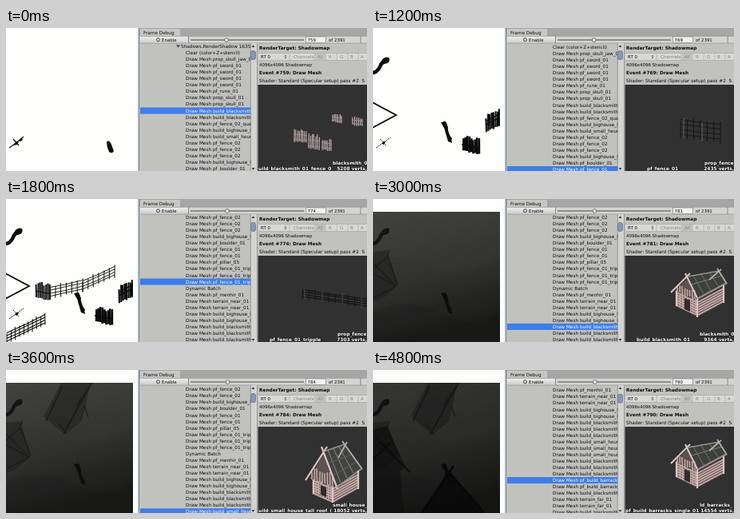
These frames come from a looping animation (452 by 179 pixels, 5400 ms). An HTML page:

```html
<!DOCTYPE html>
<html lang="en">
<head>
<meta charset="utf-8">
<title>Frame Debug</title>
<style>
html, body { margin: 0; width: 100%; height: 100%; overflow: hidden; background: #fefefc; }
svg { display: block; width: 452px; height: 179px; }
text { font: 5.78px "DejaVu Sans", sans-serif; fill: #0c0c0c; white-space: pre; }
.b { font-weight: bold; font-size: 5.8px; }
.r { font-size: 5.75px; }
.s { font-size: 5.45px; }
.dim { fill: #858585; font-size: 5.5px; }
.cap { font-weight: bold; font-size: 5.9px; fill: #fff; paint-order: stroke; stroke: #111; stroke-width: 1px; }
.end { text-anchor: end; }
.state { visibility: hidden; animation: show 5400ms step-end infinite; animation-delay: calc(var(--i) * 600ms - 5400ms); }
@keyframes show { 0% { visibility: visible; } 11.1112%, 100% { visibility: hidden; } }
</style>
</head>
<body>
<svg id="stage" viewBox="0 0 452 179" xmlns="http://www.w3.org/2000/svg"></svg>
<script>
const text = (x, y, s, cls = '', extra = '') => `<text x="${x}" y="${y}" class="${cls}" ${extra}>${s}</text>`;
const rect = (x, y, w, h, fill, extra = '') => `<rect x="${x}" y="${y}" width="${w}" height="${h}" fill="${fill}" ${extra}/>`;
const line = (d, color, w = 1, extra = '') => `<path d="${d}" fill="none" stroke="${color}" stroke-width="${w}" ${extra}/>`;
const shape = (d, fill, extra = '') => `<path d="${d}" fill="${fill}" ${extra}/>`;
const random = seed => () => (seed = (seed * 16807) % 2147483647) / 2147483647;

// Upright boards of uneven length standing on the line x0,y0 - x1,y1.
function pickets(x0, y0, x1, y1, h, n, w, color, seed = 7) {
  const rnd = random(seed * 977);
  let d = '';
  for (let k = 0; k < n; k++) {
    const t = k / (n - 1), x = x0 + (x1 - x0) * t, y = y0 + (y1 - y0) * t;
    const top = y - h * (0.82 + 0.28 * rnd());
    d += `M${x.toFixed(1)} ${(y + rnd() * 2).toFixed(1)}L${(x + rnd() - 0.5).toFixed(1)} ${top.toFixed(1)}`;
  }
  return line(d, color, w);
}

// Rail fence: several rails with thin posts.
function rails(x0, y0, x1, y1, h, n, color, w = 0.9) {
  let d = '';
  for (let k = 0; k < 4; k++) {
    const up = h * (0.15 + k * 0.25), bow = k % 2 ? 1.5 : -0.5;
    d += `M${x0} ${y0 - up}Q${(x0 + x1) / 2} ${(y0 + y1) / 2 - up + bow} ${x1} ${y1 - up}`;
  }
  return line(d, color, w) + pickets(x0, y0, x1, y1, h, n, 1, color, 3);
}

const rows = ['Shadows.RenderShadow 1635', 'Clear (color+Z+stencil)'];
[['prop_skull_jaw_01', 1], ['pf_sword_01', 4], ['pf_rune_01', 1], ['prop_skull_01', 2],
 ['build_blacksmith_01', 2], ['pf_fence_02_quad', 1], ['build_bighouse_l', 1], ['build_small_house', 1],
 ['pf_fence_02', 3], ['build_bighouse_l', 1], ['pf_boulder_01', 1], ['pf_fence_01', 2], ['pf_pillar_05', 1],
 ['pf_fence_01_tripple', 3], ['', 1], ['pf_menhir_01', 1], ['terrain_near_01', 2], ['build_bighouse_l', 2],
 ['build_blacksmith_01', 3], ['build_small_house', 3], ['build_blacksmith_01', 3], ['pf_build_barracks', 2],
 ['build_blacksmith_01', 1], ['terrain_far_01', 2], ['build_blacksmith_01', 1]
].forEach(([name, count]) => {
  for (; count--;) rows.push(name ? 'Draw Mesh ' + name : 'Dynamic Batch');
});

function list(event, scroll) {
  let out = '';
  rows.forEach((name, k) => {
    const y = 23 + 8.05 * k - scroll;
    if (y < 13 || y > 184) return;
    const picked = k === event - 749;
    if (picked) out += rect(168, y - 4, 138.5, 8, '#3e7de7');
    if (!k) out += shape(`M213 ${y - 2}h5l-2.5 4z`, '#555');
    out += text(k ? 225 : 219, y + 2, name, '', picked ? 'style="fill:#fff"' : '');
  });
  return `<g clip-path="url(#listClip)">${out}</g>` +
    rect(306.5, 28.5 + scroll * 0.008, 6, 11, '#8798b8', 'rx="2.5" stroke="#5c6b8b" stroke-width=".7"');
}

// Shadow map pieces
const ink = '#0b0b0b';
const plane = line('M4 150L9 146.5L13 143.5L22 136M9 139l7 8', ink, 1.2) +
  shape('M9 147l3-4 4-1-2 4zM16 141l4-3 1 2-3 2z', ink);
const faintPlane = line('M4 150L22 137M9 139l8 9', ink, 1, 'stroke-dasharray="2 1"') + shape('M11 145l2-3 3 0-2 4z', ink);
const stone = shape('M126 142Q130 140 132 146L135 154Q133 158 129 155Q126 149 126 142Z', ink);
const hookTop = c => line('M-1 56Q5 56 9 48Q11 41 19 40', c, 4.5) + shape('M11 40Q15 35 20 37Q22 41 18 44L11 46Z', c);
const hookLow = c => line('M88 118Q92 121 92 128Q94 137 98 140', c, 4) + shape('M85 118l6-1 3 8-4 2zM92 135l6 3 1 6-5-2z', c);
const boards = pickets(113, 153, 133, 157, 18, 9, 2.5, ink, 4) + line('M111 146L134 150', ink, 1.5) +
  pickets(142, 129, 158, 121, 19, 8, 2.1, ink, 9) + line('M141 121L159 112M141 117L159 107', ink, 1.4);
const gable = line('M-1 93L29 109L-1 125', ink, 1.8);
const railFences = pickets(38, 122, 55, 126, 18, 8, 1.9, ink, 5) + line('M37 115L56 119', ink, 1.2) +
  rails(55, 124, 96, 115, 15, 7, ink) + rails(96, 115, 136, 97, 14, 7, ink) +
  rails(1, 180, 49, 157, 14, 10, ink, 1.1);

const night = rect(0, 16, 159, 163, 'url(#night)') +
  shape('M0 75Q40 66 78 84T158 72V179H0Z', '#1b1b1b', 'opacity=".07"') +
  shape('M0 139Q45 122 91 145T158 139V179H0Z', '#111', 'opacity=".1"');
const dusk = night + hookTop('#141414') + hookLow('#0e0e0e') +
  line('M-1 79L29 109L-1 125M-1 93L29 109', '#161616', 1.5, 'opacity=".75"');
const leftRoof = shape('M0 66L18 64L31 108L12 125L0 128Z', '#1c1c1b', 'opacity=".5"') +
  line('M16 76L21 63M0 88L18 72L31 107', '#161616', 1.6, 'opacity=".6"');
const topHouse = shape('M47 58L69 16H106L95 64L74 81L56 66Z', '#1a1a1a', 'opacity=".45"') +
  line('M50 64L71 20M72 80L101 27M88 45L108 16', '#131313', 2, 'opacity=".6"') +
  line('M66 67L76 80M98 45L103 59', '#181818', 2, 'opacity=".6"');
const lowRoof = shape('M61 179L92 129H98L139 179Z', '#0a0a0a', 'opacity=".88"') +
  line('M61 179L101 120M88 120L138 177', '#070707', 3);
const foreground = rect(0, 16, 159, 163, '#080808', 'opacity=".2"') +
  shape('M0 74L17 70L41 121L34 127L39 179H0Z', '#0d0d0d', 'opacity=".6"') +
  line('M0 112L22 91M8 89L46 128', '#0a0a0a', 2.5, 'opacity=".8"');

// Preview meshes
const wood = '#c5aaa5', grey = '#92928e', pale = '#dac4bf';
const smallFence = (x, y, w, h) => pickets(x, y + h - 2, x + w, y + h, h - 2, Math.round(w / 2), 1.2, '#b9aaa8', x) +
  line(`M${x - 1} ${y + h * .35}l${w + 2} 2M${x - 1} ${y + h * .75}l${w + 2} 2`, '#a49896', .9);
const meshFences = smallFence(409, 107, 11, 11) + smallFence(434, 111, 12, 11) + smallFence(361, 127, 15, 16) +
  smallFence(379, 133, 13, 19) + smallFence(396, 138, 11, 15);
const meshBoards = pickets(393, 150, 420, 139, 39, 9, 3.1, '#555954', 8) + pickets(393, 149, 420, 138, 38, 9, 2.3, '#858b87', 8) +
  line('M386 126L428 113M387 145L429 131', '#c9c9c5', 1.4) +
  line('M387 101L390 154', wood, 4.5) + line('M423 91L425 139', wood, 5) + line('M388 101L391 154M425 91L427 139', '#8f7b76', 1);
const meshRail = rails(385, 137, 435, 143, 25, 7, '#151515') + line('M389 113V138M412 118V142', '#77736e', .8);
const meshRails = rails(371, 124, 453, 136, 12, 11, '#161514', 1.2) +
  line('M374 112V125M396 115V129M421 118V133M445 121V137', '#5d5550', .8);
const meshLand = shape('M370 138Q374 128 388 127Q405 127 417 119Q427 108 434 108Q439 111 434 123L444 135Q440 143 427 147Q413 153 396 147Q380 146 370 138Z', 'url(#land)') +
  line('M374 137Q405 139 434 114M382 142Q415 143 437 126M397 146Q423 147 441 134', '#9b9b9b', .8) + line('M380 131Q408 133 428 115', '#cfcfcf', .7);

// Stacked logs, n high, from the top log downwards.
const logs = (x0, y0, x1, y1, n) => {
  let d = '';
  for (let k = 0; k < n; k++) d += `M${x0} ${y0 + k * 3.2}L${x1} ${y1 + k * 3.2}`;
  return line(d, '#5d5050', 3.2) + line(d, wood, 1.8);
};
const meshTall = shape('M398 102L424 93L445 123L414 146Z', '#41433f') +
  line('M403 100L419 141M410 98L427 135M417 96L435 129', '#74767a', 1.3) + line('M405 116L432 106M411 131L439 115', '#5f615f', 1) +
  logs(384, 138, 409, 149, 6) + logs(409, 149, 441, 131, 6) +
  shape('M398 104L380 136L411 146Z', '#5d5250') + pickets(383, 137, 409, 145, 15, 9, 1.5, wood, 6) +
  pickets(385, 153, 407, 162, 16, 8, 1.6, wood, 5) + shape('M394 144l7 3v12l-7-3z', '#2f2b2a') +
  line('M375 138L402 96M395 96L415 149', pale, 2.2) + line('M398 102L424 93', grey, 1.8) +
  line('M421 89L446 124M427 90L416 110', '#b5aeab', 1.8) + line('M414 147L446 123', grey, 2) +
  line('M385 137V155M409 146V166M441 126V149', pale, 2.3);
const meshBarracks = shape('M394 97L434 90L442 105L406 124Z', '#3e403b') +
  line('M401 96L414 119M411 94L423 115M421 92L433 110', '#666a66', 1.1) + line('M399 107L437 96', '#7b7e79', 1) +
  logs(380, 117, 405, 129, 6) + logs(407, 129, 439, 112, 6) +
  shape('M394 99L378 115L404 125Z', '#5d5250') + pickets(381, 116, 403, 124, 9, 8, 1.5, wood, 6) +
  pickets(381, 133, 404, 143, 17, 8, 1.5, wood, 5) + shape('M390 124l7 3v14l-7-3z', '#302d2c') +
  line('M373 117L397 93M391 93L407 126', pale, 2) + line('M394 97L434 90', grey, 1.6) +
  line('M431 87L443 106M436 88L421 101', '#b5aeab', 1.7) + line('M406 125L443 105', grey, 2) +
  line('M380 115V134M406 125V148M439 108V130', pale, 2.2);

const standard = 'Shader: Standard (Specular setup) pass #2  S';
const terrain = 'Shader: Standard Terrain(Specular setup) pass';
const caption = (x, name, topX, top, verts) => text(x, 178, name, 'cap') + text(topX, 171, top, 'cap') + text(452, 178, verts + ' verts,', 'cap end');
const fenceSet = hookTop(ink) + hookLow(ink) + faintPlane + boards;
const tallCaption = caption(312, 'build_small_house_tall_roof_(', 409, 'small_house_', 18052);

const states = [
  { event: 759, scroll: 0, scene: plane + stone, mesh: meshFences, label: caption(312, 'build_blacksmith_01_fence_0', 409, 'blacksmith_0', 5208) },
  { event: 764, scroll: 0, scene: fenceSet, mesh: meshBoards, label: caption(343, 'pf_fence_02', 415, 'prop_fence_', 1313) },
  { event: 769, scroll: 7, scene: fenceSet + gable, mesh: meshRail, label: caption(343, 'pf_fence_01', 415, 'prop_fence_', 2435) },
  { event: 774, scroll: 120.7, scene: fenceSet + gable + railFences, mesh: meshRails, label: caption(330, 'pf_fence_01_tripple', 415, 'prop_fence_', 7303) },
  { event: 778, scroll: 120.7, scene: dusk, mesh: meshLand, shader: terrain, label: caption(337, 'terrain_near_01', 414, 'terrain_near', 4260) },
  { event: 781, scroll: 120.7, scene: dusk + leftRoof, mesh: meshBarracks, label: caption(330, 'build_blacksmith_01', 409, 'blacksmith_0', 9364) },
  { event: 784, scroll: 127.5, scene: dusk + leftRoof + topHouse, mesh: meshTall, label: tallCaption },
  { event: 786, scroll: 143.6, scene: dusk + leftRoof + topHouse + lowRoof, mesh: meshTall, label: tallCaption },
  { event: 790, scroll: 215, scene: dusk + leftRoof + topHouse + foreground + lowRoof, mesh: meshBarracks, label: caption(316, 'pf_build_barracks_single_01', 409, 'ld_barracks_', 14554) }
];

const defs = `<defs>
  <clipPath id="listClip"><rect x="168" y="19.5" width="138.5" height="160"/></clipPath>
  <clipPath id="meshClip"><rect x="315.5" y="71" width="137" height="108"/></clipPath>
  <clipPath id="sceneClip"><rect y="16" width="159" height="163"/></clipPath>
  <linearGradient id="night" x2=".25" y2="1"><stop stop-color="#42423f"/><stop offset=".55" stop-color="#333331"/><stop offset="1" stop-color="#1a1a19"/></linearGradient>
  <linearGradient id="land" x2="0" y2="1"><stop stop-color="#bdbdbd"/><stop offset="1" stop-color="#aaa"/></linearGradient>
  <linearGradient id="bar" x2="0" y2="1"><stop stop-color="#eee"/><stop offset="1" stop-color="#ccc"/></linearGradient>
</defs>`;

const chrome = rect(0, 0, 452, 179, '#fefefc') + rect(164.5, 0, 1.5, 179, '#d3dce4') +
  rect(167, 0, 286, 179, '#c1c2be') + rect(167, 0, 286, 10, '#a6a6a4') +
  rect(168, 1, 50, 10, '#c7c7c4', 'rx="1.5"') + text(172, 7.7, 'Frame Debug', 'r') +
  rect(168, 10, 285, 9, '#d4d4d2') + rect(168, 10.5, 60, 8, 'url(#bar)') +
  line('M168 10.3H452M168 19H452', '#929292', .7) + line('M228.5 10V19M444 10V19', '#777', .8) + line('M166.5 0V179', '#74879a', 1.1) +
  `<circle cx="190.5" cy="14.7" r="2" fill="none" stroke="#333" stroke-width=".9"/>` +
  text(195, 17, 'Enable', 's') + line('M231 15H373', '#777', 1.5) +
  rect(375.5, 11, 25, 7.5, '#f0f0f0', 'stroke="#777" stroke-width=".6"') + text(404, 17, 'of 2391', 's') +
  rect(306.5, 19, 8, 160, '#d3d3d0') + line('M306.3 19V179M314.5 19V179', '#8c8c8c', .8) +
  shape('M307.5 24l2-3 2 3zM307.5 175l2 3 2-3z', '#444') +
  text(317, 26.5, 'RenderTarget: Shadowmap', 'b') +
  rect(316, 31.5, 137, 9, '#d8d8d5') + line('M316 31.5H452M316 40.5H452M355 31.5V40.5M386 31.5V40.5M400 31.5V40.5M414 31.5V40.5M428 31.5V40.5M441 31.5V40.5', '#a4a4a4', .6) +
  text(319, 38.3, 'RT 0', 's') + shape('M348.5 35.5h3l-1.5-2zM348.5 36.5h3l-1.5 2z', '#666') +
  text(360, 38.3, 'Channels', 'dim') + rect(387, 32, 13, 8, '#c0c0be') +
  ['All', 'R', 'G', 'B', 'A'].map((s, k) => text([390, 404, 418, 431, 444][k], 38.3, s, 'dim')).join('') +
  text(317, 47.5, '4096x4096 Shadowmap', 's') + rect(315.5, 71, 137, 108, '#313131');

const frame = (s, i) => `<g class="state" style="--i:${i}">
  <g clip-path="url(#sceneClip)">${s.scene}</g>
  ${list(s.event, s.scroll)}
  <circle cx="${231 + 142 * s.event / 2391}" cy="15" r="2.4" fill="#eee" stroke="#555" stroke-width=".8"/>
  ${text(377.5, 17, s.event, 's')}
  ${text(317, 58, `Event #${s.event}: Draw Mesh`, 'b')}
  ${text(317, 67.5, s.shader || standard, 'r')}
  <g clip-path="url(#meshClip)">${s.mesh}${s.label}</g>
</g>`;

document.getElementById('stage').innerHTML = defs + chrome + states.map(frame).join('');
</script>
</body>
</html>
```
